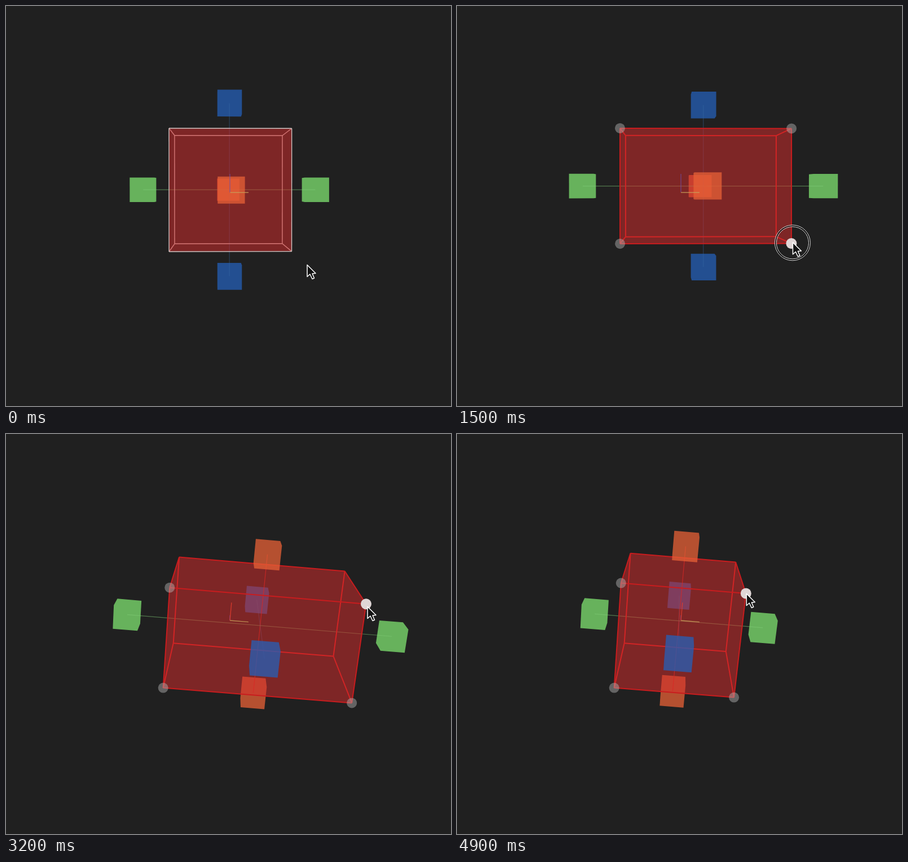
An HTML page with a canvas for the animation above (5000 ms loop, 789 px wide and 710 px high).

```html
<!DOCTYPE html>
<html lang="en">
<head>
<meta charset="utf-8">
<title>Box gizmo</title>
<style>
  html, body { margin: 0; width: 100%; height: 100%; overflow: hidden; background: #202020; }
  canvas { display: block; }
</style>
</head>
<body>
<canvas id="stage" width="789" height="710"></canvas>
<script>
const ctx = document.getElementById('stage').getContext('2d');
const LOOP = 5000, STEP = 100;
const FOCAL = 1331, DIST = 6.537, CX = 397, CY = 331;
const KNOB = 0.105, REACH = 0.75, AXIS = 0.162;
const LEAD = 28; // ms by which the pointer runs ahead of the dragged corner
const AXES = [0, 1, 2];
const LOW = [-.43, -.504], TOP = .526;

const KNOB_FILL = ['rgba(231,97,54,.75)', 'rgba(127,227,112,.75)', 'rgba(37,95,183,.75)'];
const ROD = ['rgba(215,35,30,.75)', 'rgba(130,205,120,.5)', 'rgba(60,110,170,.4)'];
const AXIS_INK = ['rgba(225,60,45,.9)', 'rgba(200,160,90,.8)', 'rgba(110,80,170,.7)'];

// Key points: [time, ...values]
const corner = [ // x, y, z of the dragged corner
  [600, .42, .496, -.479], [1000, .42, 1.524, -1], [1200, .42, 1.04, -1.206],
  [1500, .42, .895, -.4145], [1700, .42, 1.037, -.61], [3250, .42, 1.037, -.61],
  [3600, .866, 1.25, -.61], [3900, .938, 1.42, -.61], [4050, 1.05, 1.43, -.61],
  [4200, .942, 1.335, -.61], [4850, .4456, .469, -.61]
];
const approach = [[0, 533, 458], [600, 508, 438]];
const travel = [[1700, 625, 466], [2400, 573, 626], [2650, 571, 640], [3150, 640, 305]];

const between = (t, a, b) => t >= a && t < b;
function ease(t, a, b) {
  const k = Math.min(1, Math.max(0, (t - a) / (b - a)));
  return k * k * (3 - 2 * k);
}

// Smooth curve through key points, at rest at both ends
function spline(keys, t) {
  const last = keys.length - 1;
  const n = keys.findIndex(key => key[0] > t);
  if (n < 1) return keys[n ? last : 0].slice(1);
  const a = keys[n - 1], b = keys[n], span = b[0] - a[0], k = (t - a[0]) / span;
  const slope = (j, i) => j < 1 || j >= last ? 0 :
    (keys[j + 1][i] - keys[j - 1][i]) / (keys[j + 1][0] - keys[j - 1][0]);
  const mix = k * k * (3 - 2 * k);
  return a.slice(1).map((v, j) => {
    const i = j + 1;
    return v + (b[i] - v) * mix +
      span * k * (1 - k) * ((1 - k) * slope(n - 1, i) - k * slope(n, i));
  });
}

function cameraAt(t) {
  const yaw = .0203 + .0657 * ease(t, 1700, 1950);
  const pitch = (73.6 * ease(t, 1800, 2710) - .39) * Math.PI / 180;
  const sy = Math.sin(yaw), cy = Math.cos(yaw), s = Math.sin(pitch), c = Math.cos(pitch);
  return {
    eye: [cy * c * DIST, -sy * c * DIST, -s * DIST],
    project([x, y, z]) {
      const u = x * cy - y * sy;
      const k = FOCAL / (DIST - (u * c - z * s));
      return [CX + (x * sy + y * cy) * k, CY - (u * s + z * c) * k];
    }
  };
}

function pointerAt(t, project) {
  if (t <= 600) return spline(approach, t);
  if (between(t, 1700, 3250)) return spline(travel, t);
  const [x, y] = project(spline(corner, t + LEAD));
  return t < 1700 ? [x, y] : [x, y + 6 - 7 * ease(t, 3900, 4900)];
}

// Bit i of the index picks the high side on axis i
const corners = (lo, hi) =>
  [...Array(8).keys()].map(n => lo.map((v, i) => n >> i & 1 ? hi[i] : v));

function hull(points) {
  const p = [...points].sort((a, b) => a[0] - b[0] || a[1] - b[1]);
  const half = list => {
    const out = [];
    for (const q of list) {
      while (out.length > 1) {
        const a = out[out.length - 2], b = out[out.length - 1];
        if ((b[0] - a[0]) * (q[1] - a[1]) - (b[1] - a[1]) * (q[0] - a[0]) > 0) break;
        out.pop();
      }
      out.push(q);
    }
    return out.slice(0, -1);
  };
  return [...half(p), ...half(p.reverse())];
}

function path(points, close) {
  ctx.beginPath();
  points.forEach(p => ctx.lineTo(p[0], p[1]));
  if (close) ctx.closePath();
}
function solid(points, fill) {
  path(hull(points), true);
  ctx.fillStyle = fill;
  ctx.fill();
}
function line(a, b, ink, width) {
  path([a, b]);
  ctx.strokeStyle = ink;
  ctx.lineWidth = width;
  ctx.stroke();
}
function circle(x, y, r) {
  ctx.beginPath();
  ctx.arc(x, y, r, 0, Math.PI * 2);
}

function drawPointer(x, y, pressed) {
  if (pressed) {
    for (const [r, width, ink] of [[30, 3.2, 'rgba(0,0,0,.7)'], [28.6, 1, '#ddd'], [31.5, 1, '#ddd']]) {
      circle(x + .5, y + 2, r);
      ctx.lineWidth = width;
      ctx.strokeStyle = ink;
      ctx.stroke();
    }
  }
  const arrow = [[0, 0], [0, 21], [5, 16.5], [9, 25], [12.5, 23.5], [9, 15.5], [15, 15]];
  path(arrow.map(p => [x + p[0] + 1, y + p[1] + 1.5]), true);
  ctx.fillStyle = '#111';
  ctx.fill();
  ctx.strokeStyle = '#fff';
  ctx.lineWidth = 1.5;
  ctx.stroke();
}

function draw(t) {
  const { eye, project } = cameraAt(t);
  const hi = spline(corner, t);
  const lo = [...LOW, hi[2]];
  hi[2] = TOP;
  const mid = lo.map((v, i) => (v + hi[i]) / 2);
  const hover = between(t, 300, 1750) || t >= 3100;
  const pressed = between(t, 700, 1750) || between(t, 1800, 2750) || between(t, 3300, 4850);
  const facing = (i, high) => high ? eye[i] > hi[i] : eye[i] < lo[i];

  ctx.fillStyle = '#202020';
  ctx.fillRect(0, 0, 789, 710);

  const knobs = AXES.flatMap(i => [0, 1].map(high => {
    const pos = [...mid];
    pos[i] += (high ? 1 : -1) * REACH * (hi[i] - lo[i]);
    return { i, pos, front: facing(i, high) };
  }));
  const drawKnobs = front => knobs.filter(k => k.front === front).forEach(k =>
    solid(corners(k.pos.map(v => v - KNOB), k.pos.map(v => v + KNOB)).map(project), KNOB_FILL[k.i]));

  const box = corners(lo, hi).map(project);
  const drawEdges = front => {
    for (const i of AXES) for (let n = 0; n < 8; n++) {
      if (n >> i & 1) continue;
      const seen = AXES.some(j => j !== i && facing(j, n >> j & 1));
      if (seen === front)
        line(box[n], box[n | 1 << i], hover ? '#c91c1e' : '#d0c4c2', hover ? 2 : 1.4);
    }
  };

  drawKnobs(false);
  for (const i of AXES)
    line(project(knobs[2 * i].pos), project(knobs[2 * i + 1].pos), ROD[i], 1.2);
  drawEdges(false);
  solid(box, 'rgba(220,44,44,.5)');
  drawEdges(true);
  drawKnobs(true);

  for (const i of [2, 1, 0]) {
    const tip = [0, 0, 0];
    tip[i] = AXIS;
    line([CX, CY], project(tip), AXIS_INK[i], 1.3);
  }

  if (hover) {
    const onFace = t < 2000 ? n => n & 1 : n => !(n & 4);
    box.forEach((p, n) => {
      if (!onFace(n)) return;
      const held = n === 3;
      circle(p[0], p[1], held ? 9.5 : 9);
      ctx.fillStyle = held ? '#e0d6d6' : 'rgba(185,185,185,.45)';
      ctx.fill();
    });
  }

  drawPointer(...pointerAt(t, project), pressed);
}

const start = performance.now();
function tick() {
  const t = (performance.now() - start) % LOOP;
  draw(Math.floor(t / STEP) * STEP);
  requestAnimationFrame(tick);
}
ctx.lineJoin = 'round';
tick();
</script>
</body>
</html>
```
